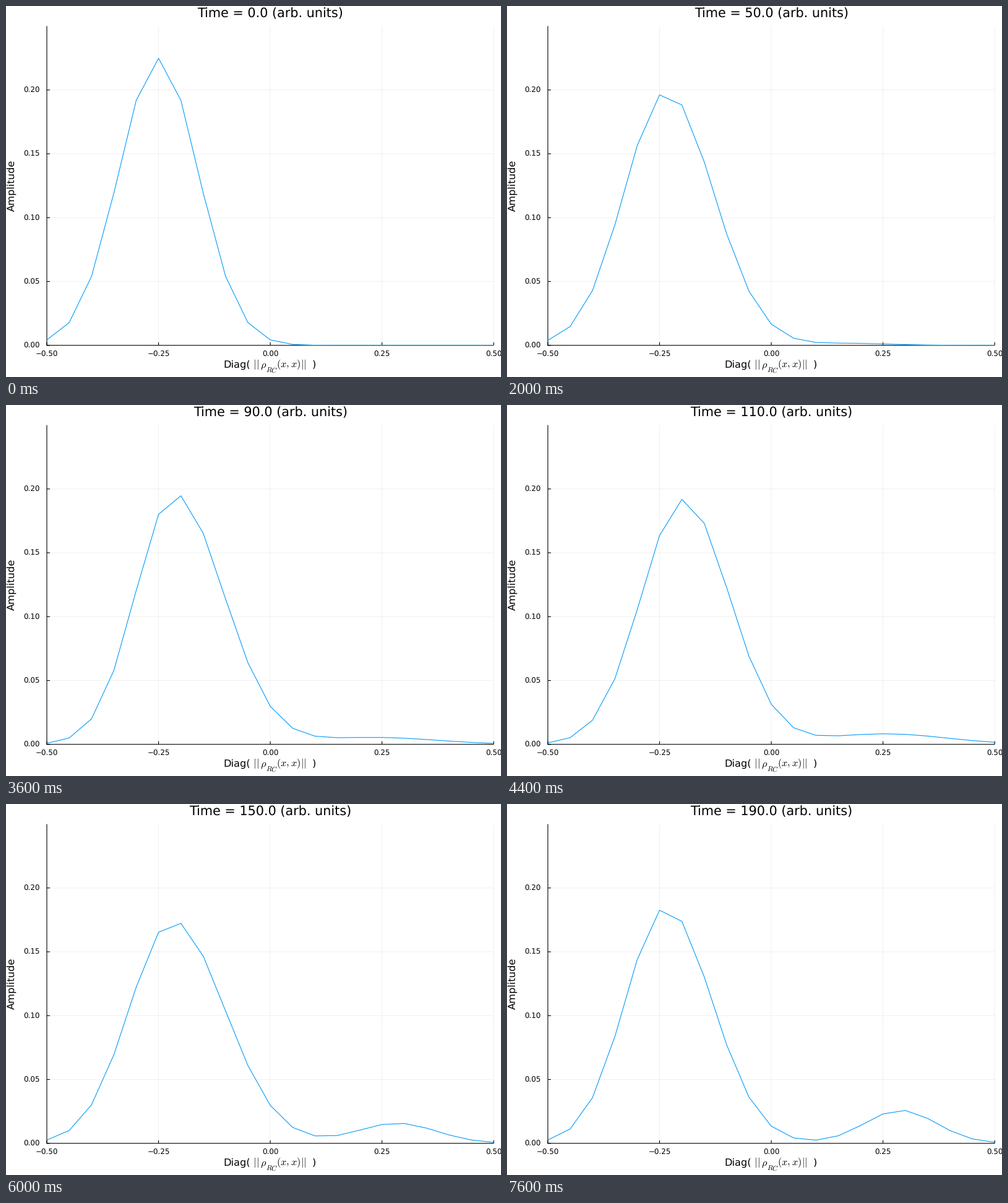
Write a matplotlib script that moves like this. It is 800 by 600 pixels and loops after 8000 ms.

```python
import numpy as np
import matplotlib.pyplot as plt
from matplotlib.animation import FuncAnimation
from matplotlib.patches import Rectangle

WIDTH, HEIGHT, DPI = 800, 600, 100
FRAMES, INTERVAL, TIME_STEP = 20, 400, 10.0
LEFT, RIGHT, TOP, BOTTOM = 66.0, 788.2, 32.5, 548.8
LINE = 1.1 * 72 / DPI

plt.rcParams.update({
    "font.family": "DejaVu Sans",
    "mathtext.fontset": "cm",
    "text.hinting": "none",
})

x = np.linspace(-0.5, 0.5, 21)

# Key points of the main packet: its peak and the widths of its two flanks.
key_times = np.array([0, 30, 50, 90, 110, 150, 190])
peak_keys = [-0.25, -0.2457, -0.2346, -0.214, -0.1965, -0.2183, -0.236]
left_keys = [0.0888, 0.0895, 0.0945, 0.087, 0.0945, 0.097, 0.0905]
right_keys = [0.0888, 0.096, 0.105, 0.109, 0.102, 0.116, 0.103]


def smooth(t, values):
    """Cubic Hermite curve through the key points, starting at rest."""
    slopes = np.gradient(values, key_times)
    slopes[0] = 0
    i = min(np.searchsorted(key_times, t, side="right") - 1, len(values) - 2)
    span = key_times[i + 1] - key_times[i]
    s = (t - key_times[i]) / span
    return ((1 + 2 * s) * (1 - s) ** 2 * values[i]
            + s * (1 - s) ** 2 * span * slopes[i]
            + s * s * (3 - 2 * s) * values[i + 1]
            + s * s * (s - 1) * span * slopes[i + 1])


def gauss(center, width):
    return np.exp(-0.5 * ((x - center) / width) ** 2)


def amplitude(t):
    """A skewed packet losing population to a growing one on the right."""
    peak = smooth(t, peak_keys)
    flank = np.where(x < peak, smooth(t, left_keys), smooth(t, right_keys))
    main = gauss(peak, flank)
    bump = 0.026 * (t / 190) ** 2.1 * gauss(
        0.1 + 0.19 * np.sin(np.pi * t / 360),
        0.08 + 0.06 * np.exp(-((t - 100) / 35) ** 2))
    return main * (1 - bump.sum()) / main.sum() + bump


def to_px(value):
    return LEFT + (value + 0.5) * (RIGHT - LEFT)


def to_py(value):
    return BOTTOM - value / 0.25 * (BOTTOM - TOP)


fig = plt.figure(figsize=(WIDTH / DPI, HEIGHT / DPI), dpi=DPI, facecolor="white")
ax = fig.add_axes([0, 0, 1, 1])
ax.set(xlim=(0, WIDTH), ylim=(HEIGHT, 0))
ax.axis("off")


def segment(xs, ys, **style):
    ax.plot(xs, ys, lw=LINE, solid_capstyle="butt", snap=False,
            **{"color": "black", **style})


def label(px, py, text, size, ha="center", **style):
    return ax.text(px, py, text, fontsize=size * 72 / DPI, ha=ha,
                   va="baseline", **style)


grid = dict(color="black", alpha=0.055, zorder=1)

for v in np.linspace(-0.5, 0.5, 5):
    px = to_px(v)
    segment([px, px], [TOP, BOTTOM], **grid)
    segment([px, px], [BOTTOM, BOTTOM - 5])
    label(px, 566.9, f"{v:.2f}".replace("-", "\u2212"), 11.9)
for v in np.linspace(0, 0.2, 5):
    py = to_py(v)
    segment([LEFT, RIGHT], [py, py], **grid)
    segment([LEFT, LEFT + 5], [py, py])
    label(54.8, py + 4.3, f"{v:.2f}", 11.9, ha="right")
segment([LEFT, LEFT], [TOP, BOTTOM + 0.5])
segment([LEFT - 0.5, RIGHT], [BOTTOM, BOTTOM])

label(13.4, (TOP + BOTTOM) / 2, "Amplitude", 16.3, rotation=90,
      rotation_mode="anchor")
label(351.2, 584.4, "Diag(", 16.3, ha="left")
for px in (401.5, 405.9, 477.9, 482.4):
    label(px, 584.4, "$|$", 16.3)
label(416.5, 584.4, r"$\rho$", 16.3)
label(430, 592.9, "$RC$", 11.4)
label(457, 584.4, "$(x, x)$", 16.3)
label(498.3, 584.4, ")", 16.3)

title = label(427.4, 18, "", 20.8)
curve, = ax.plot([], [], color="#009AFA", lw=LINE, zorder=4,
                 solid_joinstyle="miter", solid_capstyle="butt")
curve.set_clip_path(Rectangle((LEFT - 0.5, TOP), RIGHT - LEFT + 1,
                              549 - TOP, transform=ax.transData))


def update(frame):
    t = frame * TIME_STEP
    curve.set_data(to_px(x), to_py(amplitude(t)))
    title.set_text(f"Time = {t:.1f} (arb. units)")
    return curve, title


anim = FuncAnimation(fig, update, frames=FRAMES, interval=INTERVAL,
                     repeat=True, repeat_delay=0)
plt.show()
```
